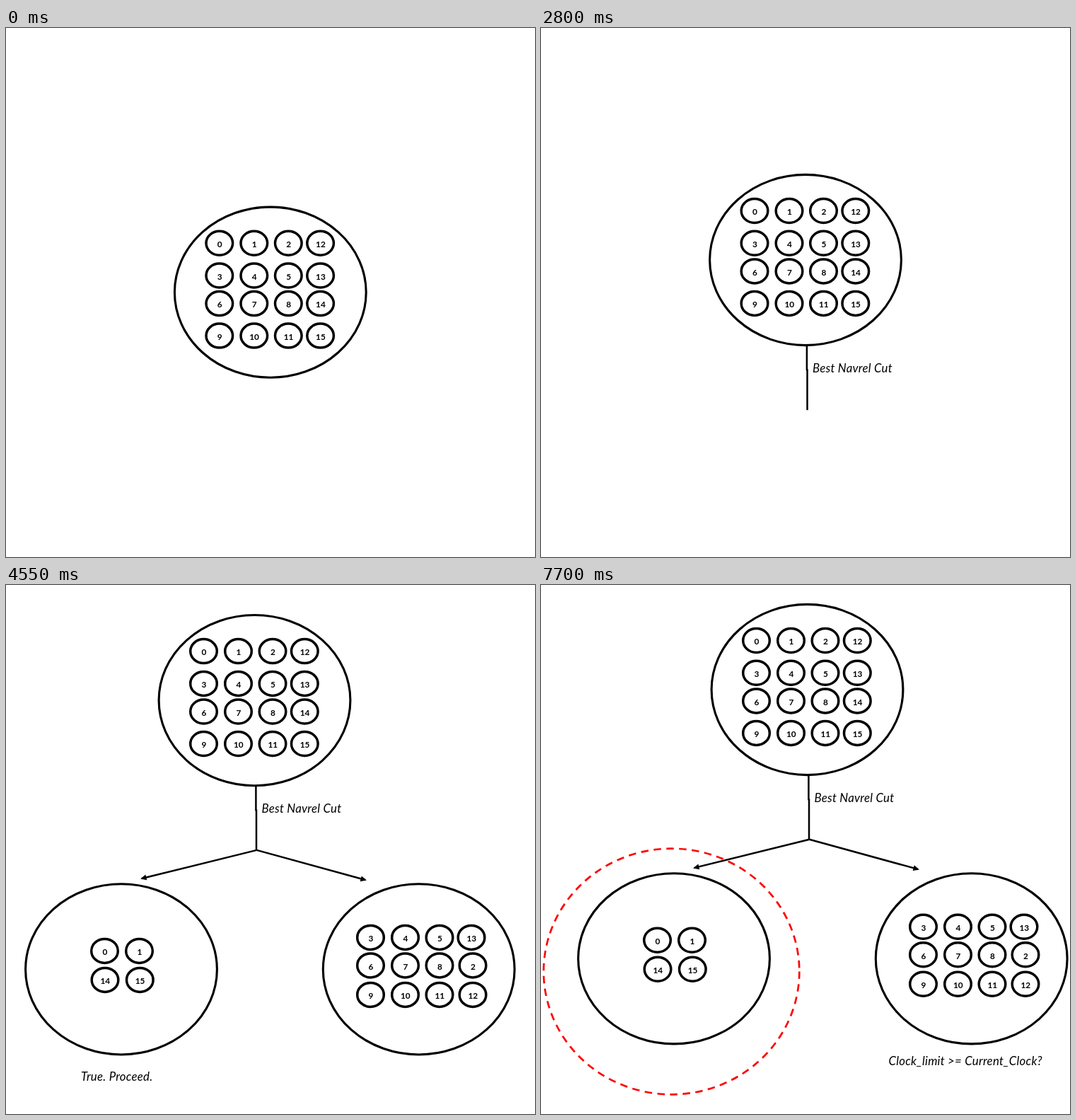
Animation, 748 px wide and 748 px high, one loop 8000 ms. Source, as an HTML page:

```html
<!DOCTYPE html>
<html lang="en">
<head>
<meta charset="utf-8">
<title>Splitting a component</title>
<style>
  html, body { margin: 0; width: 100%; height: 100%; overflow: hidden; background: #fff; }
  svg { display: block; width: 748px; height: 748px; }
  ellipse, path { fill: none; stroke: #000; }
  .set { stroke-width: 3.1; }
  .node { stroke-width: 3.5; }
  .line { stroke-width: 2.5; }
  .tip { fill: #000; stroke: none; }
  .ring { stroke: #f00; stroke-width: 2.7; stroke-dasharray: 10.5 7.5; }
  text { font: italic 16.8px Lato, Carlito, sans-serif; letter-spacing: .25px; white-space: pre; }
  .num { font: bold 11.8px Lato, Carlito, sans-serif; letter-spacing: 0; text-anchor: middle; }
</style>
</head>
<body>
<svg id="stage" viewBox="0 0 748 748"></svg>
<script>
const STEP = 350, LOOP = 8000;
const stage = document.getElementById('stage');

const ellipse = (kind, x, y, rx, ry) =>
  `<ellipse class="${kind}" cx="${x}" cy="${y}" rx="${rx}" ry="${ry}"/>`;
const bigSet = (x, y) => ellipse('set', x, y, 135.4, 120.6);
const node = (n, x, y) => ellipse('node', x, y, 18.8, 17) +
  `<text class="num" x="${x + .3}" y="${y + 5.8}">${n}</text>`;
const caption = (x, y, words) => `<text x="${x}" y="${y}">${words}</text>`;

const grid = (rows, xs, ys) => rows.map((row, r) =>
  row.map((n, c) => node(n, xs[c], ys[r])).join('')).join('');

function arrow(x0, y0, x1, y1) {
  const angle = Math.atan2(y1 - y0, x1 - x0) * 180 / Math.PI;
  return `<path class="line" d="M${x0} ${y0}L${x1} ${y1}"/>
    <path class="tip" d="M2 0L-6.5 -4V4Z" transform="translate(${x1} ${y1}) rotate(${angle})"/>`;
}

const root = bigSet(351.5, 183.7) + grid(
  [[0, 1, 2, 12], [3, 4, 5, 13], [6, 7, 8, 14], [9, 10, 11, 15]],
  [279.5, 328.5, 377, 422.3], [114.2, 160, 199.6, 245.1]);
const stem = '<path class="line" d="M353.4 304V340M354 338V396"/>' +
  caption(361.5, 342.8, 'Best Navrel Cut');
const branches = arrow(354.5, 395.5, 192, 435.6) + arrow(354.5, 395.5, 508, 437.6);
const children = bigSet(163, 564) + bigSet(583.7, 564) +
  grid([[0, 1]], [139.5, 188.5], [538]) +
  grid([[14, 15]], [140, 189.3], [579]) +
  grid([[3, 4, 5]], [515.5, 564.5, 613], [519]) + node(13, 658, 519) +
  grid([[6, 7, 8, 2], [9, 10, 11, 12]], [515.5, 564.5, 613, 660], [558.5, 600]);
const parts = [root, stem, branches, children];

// The first `count` parts of the tree, moved by dx, dy
const tree = (count, dx, dy) =>
  `<g transform="translate(${dx} ${dy})">${parts.slice(0, count).join('')}</g>`;

const clock = 'Clock_limit &gt;= Current_Clock?';
const proceed = 'True. Proceed.';
const size = 'CC_size &gt; Min_size?';
const balanced = 'Is CC fully balanced?';
const finding = 'False. Finding best Navrel Cut...';
const working = 'Processing CC';

const alone = words => tree(1, -105, 190) + caption(399.5, 352, words);
const split = (x, y, words) => tree(4, 0, -20.6) + caption(x, y, words);
const done = tree(4, 25, -35.7) + ellipse('ring', 184.5, 546.5, 180.8, 173.8);

const scenes = [
  tree(1, 22.3, 190),
  ...[clock, proceed, size, proceed, balanced].map(alone),
  tree(1, -119.9, 190) +
    caption(381, 363, 'Best Navrel Cut yields improvement') +
    caption(381, 389.3, 'greater than epsilon!'),
  alone(finding),
  tree(2, 22.5, 144.3),
  tree(3, 23.7, 120),
  tree(4, 0, 0),
  split(113, 698, working),
  split(35.5, 698.5, clock),
  split(106, 700.8, proceed),
  split(90, 701, size),
  split(106, 700.8, proceed),
  split(90, 701.5, balanced),
  split(90, 702, finding),
  tree(4, 24, -20.6) + caption(8, 702, 'Best Navrel Cut yields improvement less than epsilon!'),
  split(90, 700.8, 'Undo Split and add CC to set processed.'),
  done,
  done + caption(558, 677, working),
  done + caption(491.5, 679, clock)
];

let shown = -1;
function draw(now) {
  const index = Math.floor(now % LOOP / STEP);
  if (index !== shown) stage.innerHTML = scenes[shown = index];
  requestAnimationFrame(draw);
}
draw(performance.now());
</script>
</body>
</html>
```
